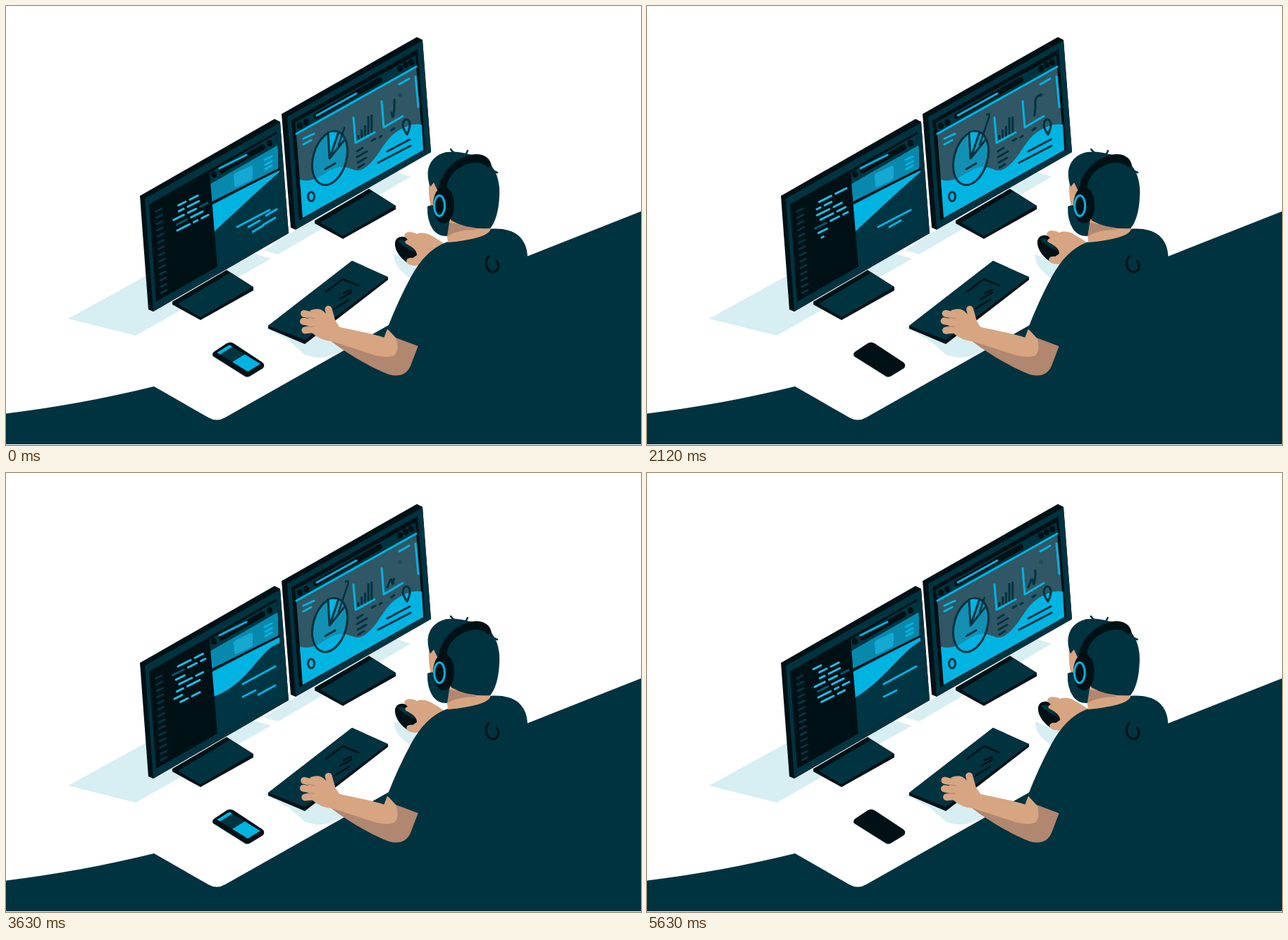
An HTML page that plays this animation: 901 px wide and 622 px high, repeating every 5.69 s.

```html
<!DOCTYPE html>
<html lang="en">
<head>
<meta charset="utf-8">
<title>Developer at a desk</title>
<style>
html, body { margin: 0; width: 100%; height: 100%; overflow: hidden; background: #fff; }
svg { display: block; width: 100vw; height: 100vh; }
.teal { fill: #003340; } .black { fill: #001116; } .cyan { fill: #00b4e2; }
.shade { fill: #d7eef3; } .skin { fill: #d7a582; } .tan { fill: #b1876f; }
.line { fill: none; stroke-width: 3; stroke-linecap: round; stroke-linejoin: round; }
.sk { stroke: #003340; } .sb { stroke: #001116; } .sc { stroke: #00b4e2; }
.finger { fill: none; stroke: #d7a582; stroke-width: 10; stroke-linecap: round; }
</style>
</head>
<body>
<svg viewBox="0 0 901 622">
  <defs>
    <clipPath id="panel"><path d="M289 236 384 181 395 316 300 370Z"/></clipPath>
    <clipPath id="unit"><path d="M0 0H1V1H0Z"/></clipPath>
  </defs>

  <!-- desk and floor -->
  <path class="shade" d="M88 443 184 467 376 358 290 332ZM366 346 386 352 574 242 545 232ZM366 455 400 473 424 494Q440 500 455 497L480 488 450 460ZM551 352Q549 366 566 380L582 392 590 368ZM290 495 340 527 348 524 310 490Z"/>
  <path class="teal" d="M0 577.500C70 569 140 556 210 539L287 583Q299 590 311 583L545 451 740 354.500 901 291V621H0Z"/>

  <!-- monitor stands -->
  <g id="stand">
    <path class="black" d="M236 419 313 374 351 398V403L276 445 236 423Z"/>
    <path class="teal" d="M244 422 318 378 350 398 276 441Z"/>
  </g>
  <use href="#stand" x="202" y="-115"/>

  <!-- left monitor -->
  <path class="black" d="M190 269 381 160 389 164 401 322 209 433 202 430Z"/>
  <path class="teal" d="M197 273 389 165 401 322 209 432Z"/>
  <path class="black" d="M203 281 384 178 394 315 213 419Z"/>
  <path id="gutter" class="line" stroke="#003442" stroke-width="3"/>
  <g id="code"></g>
  <g clip-path="url(#panel)">
    <path fill="#003543" d="M285 170H400V380H285Z"/>
    <path fill="#0789ae" d="M285 255 386 197V236L285 284Z"/>
    <path id="hill" class="cyan"/>
    <path class="line sb" d="M288 281 388 231"/>
    <path id="card" fill="#14a8d3" d="M327 236 346 227Q350 225 350 229V242Q350 245 347 247L328 256Q324 258 324 254L323 241Q323 238 327 236Z"/>
    <path class="line sc" stroke-width="2" d="M367 218 377 213M368 225 377 220M368 231 377 226"/>
    <path class="line sb" style="stroke-width:8" d="M295 238V239M306 233 364 200M374 194V195"/>
    <path id="text" class="line sc"/>
  </g>
  <path class="line sc" d="M303 230 341 211"/>

  <!-- right monitor -->
  <path class="black" d="M391 153 583 44 591 48 603 207 411 317 404 314Z"/>
  <path class="teal" d="M399 157 591 49 603 207 411 316Z"/>
  <path class="black" d="M405 162 584 61 595 203 416 304Z"/>
  <path class="teal" d="M410 165 581 70 582 86 412 181Z"/>
  <path fill="#2f5766" d="M412 182 582 86 592 204 421 300Z"/>
  <path class="cyan" d="M417 246C443 253 454 229 476 228C492 228 496 239 511 228C530 214 536 189 556 177Q574 165 590 168L592 204 421 300Z"/>
  <path class="line sc" d="M412 181 582 86"/>
  <path class="line sb" style="stroke-width:8" d="M417 169V170M426 164V165M440 156 530 105M559 88V89M567 83V84M575 79V80"/>
  <path class="line sc" d="M441 155 497 124M422 188 437 181M422 196 433 190M558 111 572 103M581 100 585 143M493 158 496 194 523 179M533 135 536 172 563 156"/>
  <path class="line sk" d="M498 206 506 201M498 214 512 206M499 222 511 215M500 229 508 224M519 191 524 188M530 186 533 184M547 176 551 173M541 206 573 189M528 222 574 198"/>
  <path class="line sk" d="M569 182C563 173 562 169 564 164C567 158 573 161 573 168Q573 174 569 182Z"/>
  <ellipse class="line sk" cx="433" cy="270" rx="4.5" ry="6.5"/>
  <path id="bars" class="line sk" style="stroke-linecap:butt"/>
  <circle cx="559" cy="126" r="3" fill="#003340" opacity=".3"/>
  <path id="chart" class="line sk" pathLength="1" d="M541 162 545 152Q547 148 548 155T551 146L551 134Q552 127 559 126"/>
  <g id="pie">
    <ellipse class="line sk" cx="459.5" cy="215.500" rx="23.500" ry="39" transform="rotate(16 459.500 215.500)" style="fill:#00b4e2;fill-opacity:.62"/>
    <path class="cyan" d="M457 180Q465 177 471 180L459 216Z"/>
    <path class="line sk" d="M457 179 459 216 480 190M459 216 471 181M453 231 467 223"/>
  </g>
  <path id="leader" class="line sk" style="stroke-width:2.500"/>

  <!-- keyboard and phone -->
  <path class="black" d="M372 453 491 361 542 384V388L424 479 372 457Z"/>
  <path class="teal" d="M372 453 491 361 542 384 424 473Z"/>
  <path class="line sb" style="stroke-width:2.500" d="M454 405 478 387 500 396M479 407 490 402M474 415 490 406M466 429 487 416"/>
  <path class="black" d="M295 490 313 478Q318 475 323 478L364 505Q368 508 365 513L347 524Q342 527 338 524L295 497Q291 494 295 490Z"/>
  <g id="phone" transform="matrix(44 27 18 -11 299 491)">
    <g clip-path="url(#unit)">
      <path class="teal" d="M0 0H1V1H0Z"/>
      <path id="feed" class="cyan" d="M0 0H.46V1H0ZM.9 0H1V1H.9ZM1.400 0H2V1H1.400Z"/>
    </g>
  </g>

  <!-- mouse hand -->
  <g id="mouse">
    <ellipse class="black" cx="571" cy="347" rx="24" ry="14" transform="rotate(48 571 347)"/>
    <path class="teal" d="M556 333Q562 328 572 337L580 348Q568 344 556 333Z"/>
    <path class="skin" d="M565 326C566 318 577 320 583 323C596 318 606 327 624 338L602 358 588 367Q576 369 570 365C566 361 569 356 577 357L583 353C583 346 577 342 570 338C565 336 565 333 570 331Z"/>
  </g>

  <!-- typing arm -->
  <path class="tan" d="M462 473 536 470 541 458 585 481 574 510Q566 528 543 522C515 511 485 493 460 474Z"/>
  <path class="skin" d="M470 454C495 460 520 464 537 470L541 458 553 469Q559 488 551 495 543 499 524 495L459 474Z"/>
  <path class="skin" d="M432 431Q446 426 453 435L468 447 474 456 462 475Q446 474 434 463L427 450Z"/>
  <g id="fingers">
    <path class="finger" d="M423 435 445 440"/><path class="finger" d="M421 447 440 450"/>
    <path class="finger" d="M425 460 445 458"/><path class="finger" d="M458 429 464 450"/>
  </g>
  <path class="line" style="stroke:#b1876f;stroke-width:1" d="M428 441 438 443M426 454 437 454"/>

  <!-- person -->
  <g id="body">
    <path class="teal" d="M624 335C603 343 588 360 575 383Q556 418 541 457L553 470 585 482 640 520 760 420 740 355C739 326 718 313 686 316Z"/>
    <path class="line sb" d="M685 354C678 362 681 375 690 377C699 377 701 367 696 361"/>
  </g>
  <g id="head">
    <path class="skin" d="M623 304 640 300 688 313 687 318Q680 330 627 335Z"/>
    <path class="tan" d="M623 306 650 310 668 317Q640 317 627 326Z"/>
    <path class="skin" d="M600 250 620 240V300L604 286Q599 275 600 250Z"/>
    <path class="teal" d="M598 284Q605 280 612 285L630 300 626 326Q614 327 606 317 597 304 598 284Z"/>
    <path class="teal" d="M602 256C593 232 602 212 625 207Q640 205 657 210C690 214 702 240 700 270C699 292 694 307 687 315Q655 317 632 304L607 250Z"/>
    <path class="line sk" style="stroke-width:2.500" d="M631 203Q635 209 643 211M655 205 651 213M690 233 697 236"/>
    <path class="black" d="M613 264C615 236 638 213 665 210C680 209 688 217 689 227L684 229C676 220 659 220 646 228 631 236 625 248 625 264Z"/>
    <ellipse class="black" cx="621" cy="282" rx="15" ry="26"/>
    <ellipse class="line sc" cx="615" cy="283" rx="7.500" ry="14.500"/>
  </g>
</svg>

<script>
const LOOP = 5690, CYCLE = LOOP / 3, ROWS = 14;
const $ = id => document.getElementById(id);
const set = (id, name, value) => $(id).setAttribute(name, value);
const clamp = v => Math.max(0, Math.min(1, v));
const ramp = (t, a, b) => { const u = clamp((t - a) / (b - a)); return u * u * (3 - 2 * u); };

// Eased interpolation through time, value pairs.
function keys(t, ...k) {
  let v = k[1];
  for (let i = 2; i < k.length; i += 2) v += (k[i + 1] - k[i - 1]) * ramp(t, k[i - 2], k[i]);
  return v;
}

let seed = 11;
const rand = () => (seed = seed * 16807 % 2147483647) / 2147483647;

// Source lines: each has an indent and a few dashes.
const rows = Array.from({ length: ROWS }, () => {
  const dashes = [];
  let x = Math.floor(rand() * 3) * 4;
  while (x < 42) {
    const w = 5 + rand() * 13;
    dashes.push({ x, w: Math.min(w, 48 - x), dark: rand() < .2 });
    x += w + 6;
    if (rand() < .25) break;
  }
  const g = document.createElementNS('http://www.w3.org/2000/svg', 'g');
  for (const d of dashes) {
    d.el = document.createElementNS('http://www.w3.org/2000/svg', 'path');
    d.el.setAttribute('class', 'line');
    d.el.setAttribute('stroke', d.dark ? '#00566c' : '#20bce4');
    g.append(d.el);
  }
  $('code').append(g);
  return { g, dashes };
});

set('gutter', 'd', Array.from({ length: 14 }, (_, i) =>
  `M${213 + i * .55} ${291 + i * 8.9}l8 -4`).join(''));

function drawCode(t) {
  const step = t / LOOP * ROWS, n = Math.floor(step);
  const scroll = n + ramp(step - n, 0, .4);
  rows.forEach(({ g, dashes }, i) => {
    const p = (i - scroll + ROWS) % ROWS;
    const shown = p < 7;
    g.setAttribute('visibility', shown ? 'visible' : 'hidden');
    if (!shown) return;
    const typed = p > 5.5 ? clamp(step - n) * 48 : 48;
    for (const { x, w, el } of dashes) {
      const len = Math.min(w, typed - x);
      const left = 236 + x + p * .6, y = 278 + p * 8.4 - x * .5;
      el.setAttribute('d', len > 0 ? `M${left} ${y}l${len} ${-len * .5}` : '');
    }
  });
}

function drawPage(phase) {
  const right = keys(phase, 0, 1, 350, 1, 650, 0, 1350, 0, 1650, 1);
  const curve = keys(phase, 0, 0, 400, 0, 700, 1, 1780, 1, CYCLE, 0);
  const mix = (a, b) => a + (b - a) * curve;
  set('card', 'transform', `translate(${-29 * (1 - right)} ${16 * (1 - right)})`);
  set('hill', 'd', `M290 283 388 233V${mix(235, 241)}C${mix(357, 361)} ${mix(262, 248)} ` +
    `${mix(326, 344)} ${mix(291, 300)} 294 ${mix(321, 317)}Z`);
  const y = -5 * right;
  set('text', 'd', curve < .5
    ? `M328 313 374 289M344 313 360 304` + (phase < 120 ? 'M350 320 365 311M369 297 384 288M365 310 382 300' : '')
    : `M336 ${304 + y} 382 ${279 + y}` + (right > .5
      ? 'M336 317 354 308' + (phase < 1800 ? 'M358 314 382 301' : '')
      : 'M363 303 383 292' + (phase < 900 ? 'M357 313 382 300' : '')));
}

function drawCharts(t, phase) {
  const w = 2 * Math.PI * phase / CYCLE;
  set('bars', 'd', [6, 10, 12, 21, 19].map((h, i) =>
    `M${500 + i * 4.7} ${189 - i * 2.4}v${-h - i * 1.6 * Math.sin(w + 1.4 + i * .1)}`).join(''));

  const p = (phase - 1250 + CYCLE) % CYCLE;
  const head = keys(p, 0, 0, 480, .5, 650, .8, 870, 1);
  const tail = keys(p, 0, 0, 580, 0, 680, .33, 870, .4, 1400, .96, 1800, .98);
  set('chart', 'stroke-dasharray', `${Math.max(.01, head - tail)} 3`);
  set('chart', 'stroke-dashoffset', -tail);

  const size = keys(t, 0, 1, 900, 1, 1060, 0, 1100, 0, 1360, 1, 4000, 1, 4300, 0, 5200, 0, 5480, 1);
  const lead = keys(t, 0, .58, 220, 1, 750, 1, 950, 0, 1700, 0, 2080, 1, 3680, 1, 3950, 0, 5450, 0, 5690, .58);
  const flag = keys(t, 0, 0, 180, 0, 420, 1, 600, 1, 780, 0, 2060, 0, 2450, 1, 3000, 1, 3660, 0);
  set('pie', 'transform', `translate(459.5 215.5) scale(${size}) translate(-459.5 -215.5)`);
  set('leader', 'd', lead > .02
    ? `M472 197l${14 * lead} ${-42 * lead}` + (lead > .95 ? `M482 154l${3 + 7 * flag} ${-1 - 4 * flag}` : '')
    : '');
}

function drawPhone(t) {
  const on = t < 1000 || t > 2300 && t < 4100;
  set('phone', 'visibility', on ? 'visible' : 'hidden');
  const scroll = t < 1500 ? .9 : .9 * ramp(t, 3150, 3560);
  set('feed', 'transform', `translate(${-scroll} 0)`);
}

function drawPerson(t) {
  const x = keys(t, 0, 0, 700, 0, 1280, -1, 2120, 2, 2660, 0, 3630, 0, 4840, -2, 5570, 3);
  const y = keys(t, 0, 0, 700, 0, 1280, -3, 2120, -2, 2660, 0, 3630, 0, 4840, -3, 5570, -3);
  set('mouse', 'transform', `translate(${x} ${y})`);
  const sway = -Math.max(0, x) / 2.5;
  set('head', 'transform', `translate(${sway} 0)`);
  set('body', 'transform', `translate(${sway / 2} 0)`);
  [...$('fingers').children].forEach((f, i) => {
    const a = 2 * Math.PI * 11 * t / LOOP + i * 1.9;
    f.setAttribute('transform', `translate(${Math.sin(a)} ${.8 * Math.cos(a)})`);
  });
}

function frame(now) {
  const t = now % LOOP, phase = t % CYCLE;
  drawCode(t);
  drawPage(phase);
  drawCharts(t, phase);
  drawPhone(t);
  drawPerson(t);
  requestAnimationFrame(frame);
}
frame(0);
</script>
</body>
</html>
```
